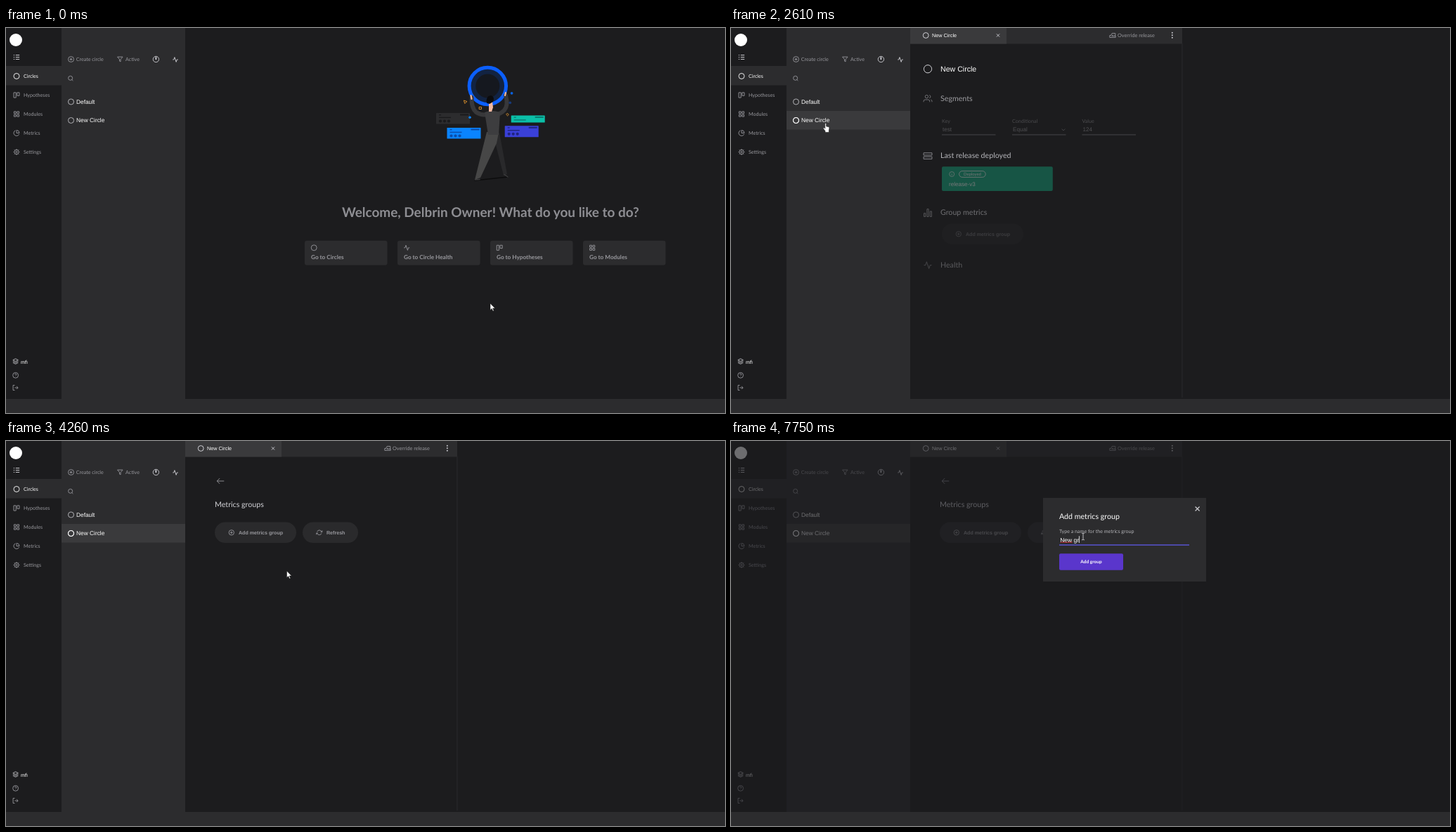
Recreate the animation shown at these times as an HTML page. Size 1023x548 px, loop 8 s.

```html
<!DOCTYPE html>
<html lang="en">
<head>
<meta charset="utf-8">
<title>Metrics group walkthrough</title>
<style>
html, body { margin: 0; width: 100%; height: 100%; overflow: hidden; background: #1c1c1e; }
svg { display: block; }
text { font-family: Lato, sans-serif; white-space: pre; text-rendering: geometricPrecision; }
.arial { font-family: "Liberation Sans", Arial, sans-serif; }
</style>
</head>
<body>
<svg id="stage" width="100%" height="100%" viewBox="0 0 1023 548"></svg>
<script>
const LOOP = 8000;
const GRAY = '#98989d', DIM = '#8e8e93', WHITE = '#fff', LIGHT = '#d1d1d6';
const BACK = '#1c1c1e', PANEL = '#2c2c2e', ACTIVE = '#3a3a3c';

// Icon outlines on a 24 x 24 grid
const ring = (x, y, r) => `M${x - r} ${y}a${r} ${r} 0 1 0 ${2 * r} 0a${r} ${r} 0 1 0 ${-2 * r} 0`;
const ICONS = {
  circle: ring(12, 12, 10),
  menu: 'M9 5h13M9 12h13M9 19h13M2 5h3M2 12h3M2 19h3',
  board: 'M2 3h8v18H2zM14 3h8v11h-8z',
  grid: 'M3 3h7v7H3zM14 3h7v7h-7zM14 14h7v7h-7zM3 14h7v7H3z',
  pie: 'M21.2 15.9A10 10 0 1 1 8 2.8M22 12A10 10 0 0 0 12 2v10z',
  gear: ring(12, 12, 3) + ring(12, 12, 8) + 'M12 1v3M12 20v3M1 12h3M20 12h3M4.2 4.2l2 2M17.8 17.8l2 2M4.2 19.8l2-2M17.8 6.2l2-2',
  layers: 'M12 2L2 7l10 5 10-5zM2 17l10 5 10-5M2 12l10 5 10-5',
  help: ring(12, 12, 10) + 'M9 9a3 3 0 0 1 6 1c0 2-3 3-3 3M12 17v.5',
  logout: 'M9 21H3V3h6M16 17l5-5-5-5M21 12H9',
  plus: ring(12, 12, 10) + 'M12 7v10M7 12h10',
  filter: 'M22 3H2l8 9.5V19l4 2v-8.5z',
  clock: ring(12, 12, 10) + 'M12 5v9M9 6h6M11 7v6M13 7v6',
  activity: 'M22 12h-4l-3 9L9 3l-3 9H2',
  search: ring(11, 11, 8) + 'M21 21l-4.4-4.4',
  users: 'M17 21v-2a4 4 0 0 0-4-4H5a4 4 0 0 0-4 4v2M23 21v-2a4 4 0 0 0-3-3.9M16 3.1a4 4 0 0 1 0 7.8' + ring(9, 7, 4),
  server: 'M1 4h22v6H1zM1 14h22v6H1z',
  bars: 'M2 13h4v9H2zM10 2h4v20h-4zM18 8h4v14h-4z',
  info: ring(12, 12, 10) + 'M12 11v6M12 7v1',
  back: 'M23 12H2M10 4l-8 8 8 8',
  refresh: 'M23 4v6h-6M1 20v-6h6M3.5 9a9 9 0 0 1 14.9-3.4L23 10M1 14l4.6 4.4A9 9 0 0 0 20.5 15',
  close: 'M3 3l18 18M21 3L3 21',
  override: 'M2 19V12h4l4-7h11v9M2 19h20v-5H9l4-4',
  down: 'M4 8l8 8 8-8', left: 'M16 4l-8 8 8 8', right: 'M8 4l8 8-8 8'
};

const icon = (name, x, y, size, color = GRAY, weight = 1) =>
  `<path d="${ICONS[name]}" fill="none" stroke="${color}" stroke-width="${weight * 24 / size}" stroke-linejoin="round"
    transform="translate(${x - size / 2} ${y - size / 2}) scale(${size / 24})"/>`;
const rect = (x, y, w, h, fill, r = 0, extra = '') =>
  `<rect x="${x}" y="${y}" width="${w}" height="${h}" fill="${fill}" rx="${r}" ${extra}/>`;
const dot = (x, y, r, fill) => `<circle cx="${x}" cy="${y}" r="${r}" fill="${fill}"/>`;
const path = (d, fill, extra = '') => `<path d="${d}" fill="${fill}" ${extra}/>`;
const line = (d, color, width, extra = '') =>
  path(d, 'none', `stroke="${color}" stroke-width="${width}" stroke-linecap="round" stroke-linejoin="round" ${extra}`);
// y is the optical middle of the line
const text = (x, y, str, size, fill = GRAY, extra = '') =>
  `<text x="${x}" y="${y + size * 0.35}" font-size="${size}" fill="${fill}" ${extra}>${str}</text>`;
const arial = (x, y, str, size, fill, extra = '') => text(x, y, str, size, fill, 'class="arial" ' + extra);
const group = (id, body) => `<g id="${id}">${body}</g>`;
const BOLD = 'font-weight="700"', MIDDLE = 'text-anchor="middle"';

function sidebar() {
  const items = [['circle', 'Circles'], ['board', 'Hypotheses'], ['grid', 'Modules'], ['pie', 'Metrics'], ['gear', 'Settings']];
  return rect(0, 0, 79, 528, BACK) + dot(14, 17, 9, WHITE) + icon('menu', 15, 41.5, 10, LIGHT) +
    rect(0, 54, 79, 27.5, PANEL) +
    items.map(([name, label], i) => {
      const y = 68.3 + 27 * i, color = i ? GRAY : WHITE;
      return icon(name, 15, y + .2, 9.6, color, .9) + text(25, y, label, 7.15, color);
    }).join('') +
    icon('layers', 13.6, 474.5, 9, LIGHT, .8) + text(21, 475, 'mfi', 7.2, WHITE) +
    icon('help', 13.6, 494.3, 9.4, GRAY, .9) + icon('logout', 13.6, 512, 9.4, GRAY, .9);
}

function circleList() {
  return rect(79, 0, 176, 528, PANEL) +
    icon('plus', 92.5, 44.5, 9.5, GRAY, .9) + text(99.7, 44.5, 'Create circle', 7.15) +
    icon('filter', 162.3, 44.5, 9, GRAY, .9) + text(170, 44.5, 'Active', 7.15) +
    icon('clock', 213.4, 44.5, 10, LIGHT, .9) + icon('activity', 241, 45, 9, LIGHT, .9) +
    icon('search', 92, 71.7, 9, GRAY, .9) +
    group('rowActive', rect(79, 118, 176, 26.6, ACTIVE)) +
    icon('circle', 92.5, 105, 9.6, LIGHT, .8) + arial(100, 105, 'Default', 8.35, WHITE) +
    icon('circle', 92.5, 131.5, 9.6, LIGHT, .8) +
    group('rowRing', icon('circle', 92.5, 131.5, 9.6, WHITE, 1.1)) +
    arial(100, 131.5, 'New Circle', 8.35, WHITE);
}

function miniCard(x, y, h, fill, ink) {
  const dots = h > 12 ? [6, 12, 18].map(d => dot(x + d, y + 11.5, 2.1, ink)).join('') : '';
  return rect(x, y, 48, h, fill, .6) + rect(x + 4, y + 2, 3, 1.4, ink) + rect(x + 34, y + 1.5, 12, 2, ink) +
    rect(x + 4, y + 5.7, 17, 1.4, ink) + dots;
}

function illustration() {
  return dot(685.3, 82.5, 27, '#15181f') +
    `<g fill="none"><circle cx="685.3" cy="82.5" r="20.5" stroke="#122342" stroke-width="7"/>
     <circle cx="685.3" cy="82.5" r="26.2" stroke="#0b5fff" stroke-width="5"/></g>` +
    miniCard(612, 121, 15.5, '#2c2c2e', '#1a1a1c') + miniCard(627.5, 142, 15.5, '#0a84ff', '#0b4da8') +
    miniCard(718.7, 124.5, 10, '#0bbfa8', '#0a7d72') + miniCard(709.7, 139.3, 16, '#3a40d8', '#20247e') +
    line('M667 217L714 212', '#0c0c0d', 1.4) +
    path('M693 151L702 149L713 208L708 210Z', '#29292b') +
    path('M684 148L701 149L698 164L675 213L667 216Z', '#474747') +
    line('M667.5 216L674 215.5M709 208.5L714 212', '#3c3c3e', 1.5) +
    line('M662.5 99Q662 114 669 120Q677 125 686 123', '#38383a', 6) +
    line('M711 96Q715 110 709 117Q704 122 699 123', '#38383a', 6) +
    path('M681 120Q691 116 703 120L701 152L686 152Z', '#3d3d3f') +
    path('M687 106L692 105L693 113L691 119L687 119Z', '#f2b8a0') +
    path('M684 107Q682 97 690 96Q696 98 693 105L688 108Z', '#0b0b0d') +
    line('M661.5 96L662.5 101M711 92L710 96', '#f2b8a0', 2.2) +
    dot(660, 127.2, 1.8, '#0a84ff') + dot(719.6, 92.8, 1.9, '#0a62e0') + dot(717.2, 106.3, 1.9, '#173a7a') +
    line('M651.8 103.2L656 104.6L653 107.2ZM673.5 112.5h3v3h-3zM713.6 121.6l1.7 1.7l-1.7 1.7l-1.7-1.7z', '#e0942c', .9);
}

function welcome() {
  const cards = [['circle', 'Circles'], ['activity', 'Circle Health'], ['board', 'Hypotheses'], ['grid', 'Modules']];
  return illustration() +
    text(689.3, 262, 'Welcome, Delbrin Owner! What do you like to do?', 18.95, DIM, `${BOLD} ${MIDDLE}`) +
    cards.map(([name, label], i) => {
      const x = 425 + 132 * i;
      return rect(x, 302.8, 117.5, 34.8, PANEL, 3) + icon(name, x + 13.2, 312.8, 9.5, GRAY, .9) +
        text(x + 9, 326, 'Go to ' + label, 8.2, GRAY, BOLD);
    }).join('');
}

function pill(x, y, w, name, label) {
  return rect(x, y, w, 29.5, '#2a2a2c', 14.75) + icon(name, x + 23.8, y + 14.8, 8.8, GRAY, .9) +
    arial(x + 34, y + 14.8, label, 7.1, GRAY, BOLD);
}

// Each section of the circle page fades in with its own duration
const FADES = { title: 120, segments: 215, fields: 375, release: 180, card: 375, metrics: 330, addGroup: 600, health: 450 };

function circlePage() {
  const heading = (name, y, label) => icon(name, 280, y + .6, 13, GRAY, 1) + text(298, y, label, 10.66, LIGHT);
  const field = (x, label, value) => text(x, 132.2, label, 7.15, DIM) + arial(x + 1, 144.3, value, 8.1, GRAY) +
    rect(x, 151.5, 76.5, .9, '#8e8e93');
  const ticks = [5, 4, 3, 2, 1, 0].map((n, i) => text(310, 369.6 + 31.1 * i, n.toFixed(2), 6.1, GRAY)).join('');
  return group('title', icon('circle', 280, 58.3, 13.5, LIGHT) + arial(298, 58, 'New Circle', 10.6, WHITE)) +
    group('segments', heading('users', 99.8, 'Segments')) +
    group('fields', field(300, 'Key', 'test') + field(400, 'Conditional', 'Equal') + field(499.5, 'Value', '124') +
      icon('down', 473, 144.8, 7, GRAY, .8)) +
    group('release', heading('server', 181.5, 'Last release deployed')) +
    group('card', rect(300, 197.3, 157.8, 34.7, '#11a97f', 2) + icon('info', 314.2, 208, 8.4, WHITE, .7) +
      rect(324.6, 203.6, 37.6, 8.8, 'none', 4.4, 'stroke="#fff" stroke-width=".8"') +
      text(343.4, 208, 'Deployed', 5.9, WHITE, MIDDLE) + arial(310, 222.3, 'release-v3', 8.1, WHITE)) +
    group('metrics', heading('bars', 262.5, 'Group metrics')) +
    group('addGroup', pill(300, 278.4, 116, 'plus', 'Add metrics group')) +
    group('health', heading('activity', 337, 'Health')) +
    group('chart', text(564, 335, 'Request', 7.1, LIGHT, BOLD) + icon('left', 600, 336, 7, GRAY, .8) +
      icon('right', 614.5, 336, 7, GRAY, .8) + rect(300, 353, 319, 180, '#252527', 2) +
      rect(300, 353, 310.5, 180, '#2c2c2e', 2) + ticks +
      arial(455, 456.5, 'No available data', 8.3, DIM, MIDDLE) + rect(638, 22.5, 4, 367.5, '#98989b'));
}

function circlePanel() {
  return rect(255, 0, 387, 22.5, PANEL) + rect(255, 0, 137, 22.5, ACTIVE) + rect(641.5, 22, .9, 504, PANEL) +
    icon('circle', 277.2, 10.5, 9.4, LIGHT) + arial(286, 10.5, 'New Circle', 7.25, WHITE) +
    icon('close', 380, 10.5, 5.6, LIGHT, .9) +
    group('tabActions', icon('override', 543, 10.5, 10, GRAY, .9) + text(550, 10.6, 'Override release', 7.3) +
      [6.7, 10.2, 13.7].map(y => dot(627.8, y, .95, LIGHT)).join('')) +
    `<svg width="642" height="526">${group('circlePage', circlePage())}</svg>` +
    group('groupsPage', icon('back', 305, 57, 11.5, GRAY, .9) + text(297, 90.3, 'Metrics groups', 10.66, LIGHT) +
      pill(297, 115.5, 116, 'plus', 'Add metrics group') + pill(422, 115.5, 79, 'refresh', 'Refresh'));
}

function modal() {
  return rect(444, 81, 232, 119, PANEL) + icon('close', 663.6, 96.5, 8, LIGHT, 1.1) +
    text(467, 107.3, 'Add metrics group', 10.66, WHITE) +
    group('label', text(467, 128.5, 'Type a name for the metrics group', 7.1, '#b4b4b8')) +
    rect(467, 147.5, 185, 1, '#6c6c70') + group('underline', rect(467, 147.4, 185, 1.2, '#4d48e0')) +
    arial(468.2, 140.6, '', 8.5, WHITE, 'id="typed"') +
    group('misspelt', line('M469 144.6l1.5-.8' + 'l1.5 .8l1.5-.8'.repeat(5), '#e02020', .8)) +
    group('caret', rect(0, 135.3, .8, 9.7, WHITE)) +
    rect(467, 160.3, 91, 23.5, '#313133', 2) + text(512.5, 172, 'Add group', 6.5, '#636366', `${BOLD} ${MIDDLE}`) +
    group('submit', rect(467, 160.3, 91, 23.5, '#5a36cc', 2) + text(512.5, 172, 'Add group', 6.5, WHITE, `${BOLD} ${MIDDLE}`));
}

function cursor() {
  const edge = 'stroke="#111" stroke-width=".5"';
  return group('arrow', path('M0 0V9.4L2.2 7.4L3.8 11L5.2 10.4L3.7 6.9H6.8Z', WHITE, edge)) +
    group('hand', path('M3 13.5V11.5L.6 8.6Q0 6.8 1.4 6.8L2.8 8.2V1Q3.7 -.2 4.6 1V5L8 5.8Q9 6 8.9 7L8.3 11V13.5Z', WHITE, edge)) +
    group('beam', line('M-1.6 -4.8Q0 -4.8 0 -4Q0 -4.8 1.6 -4.8M0 -4V4M-1.6 4.8Q0 4.8 0 4Q0 4.8 1.6 4.8', '#c8c8cc', .9));
}

document.getElementById('stage').innerHTML =
  rect(0, 0, 1023, 548, BACK) + sidebar() + circleList() +
  group('welcome', welcome()) + group('panel', circlePanel()) +
  group('overlay', rect(0, 0, 1023, 528, '#1b1b1e')) + rect(0, 528, 1023, 20, PANEL) +
  group('modal', modal()) + group('cursor', cursor());

const nodes = {};
document.querySelectorAll('[id]').forEach(node => nodes[node.id] = node);
const fade = (id, value) => nodes[id].setAttribute('opacity', value);
const show = (id, on) => fade(id, on ? 1 : 0);
const move = (id, x, y) => nodes[id].setAttribute('transform', `translate(${x} ${y})`);
const ramp = (t, from, to) => Math.min(1, Math.max(0, (t - from) / (to - from)));
const ease = k => k * k * (3 - 2 * k);

// Pointer moves: start, end, x, y
const MOVES = [
  [0, 1, 689, 392], [50, 600, 121.5, 141], [800, 1130, 113, 110], [1250, 1430, 129.5, 135],
  [1680, 2220, 131, 135], [2650, 3200, 606.5, 223], [3290, 3700, 385, 290],
  [3850, 4260, 399.5, 185], [4270, 4600, 405, 130], [5000, 5430, 501, 136]
];
const SHAPES = [[0, 'arrow'], [540, 'hand'], [2740, 'arrow'], [3630, 'hand'], [3820, 'arrow'], [4480, 'hand'], [4800, 'arrow'], [5250, 'beam']];
const KEYS = [[6270, 'N'], [6590, 'Ne'], [6820, 'New'], [6970, 'New '], [7610, 'New g'], [7750, 'New gr']];
const latest = (list, t, fallback) => list.reduce((value, [at, next]) => t >= at ? next : value, fallback);

function pointer(t) {
  let x = 0, y = 0;
  for (const [from, to, toX, toY] of MOVES) {
    const k = ease(ramp(t, from, to));
    x += (toX - x) * k;
    y += (toY - y) * k;
  }
  move('cursor', x, y);
  const shape = latest(SHAPES, t);
  for (const id of ['arrow', 'hand', 'beam']) show(id, id === shape);
}

function render(t) {
  const opened = t >= 1830, grouped = t >= 3820;
  show('welcome', !opened);
  show('panel', opened);
  show('rowActive', opened);
  show('rowRing', opened);
  show('tabActions', t >= 2460);
  show('circlePage', !grouped);
  for (const id in FADES) fade(id, ramp(t, 2460, 2460 + FADES[id]));
  fade('chart', ramp(t, 2850, 3100));
  fade('groupsPage', ramp(t, 3820, 4050));

  const dialog = ramp(t, 4720, 4960), focus = ramp(t, 5450, 5570);
  fade('overlay', dialog * .64);
  fade('modal', dialog);
  move('label', 0, 13 * (1 - ease(focus)));
  fade('underline', focus);
  nodes.typed.textContent = latest(KEYS, t, '');
  move('caret', 468 + nodes.typed.getComputedTextLength(), 0);
  show('caret', t >= 5470 && !(t >= 5970 && t < 6270) && !(t >= 7520 && t < 7610));
  show('misspelt', t >= 6970);
  fade('submit', ramp(t, 6250, 6440));
  pointer(t);
}

const start = performance.now();
function tick() {
  render((performance.now() - start) % LOOP);
  requestAnimationFrame(tick);
}
tick();
</script>
</body>
</html>
```
